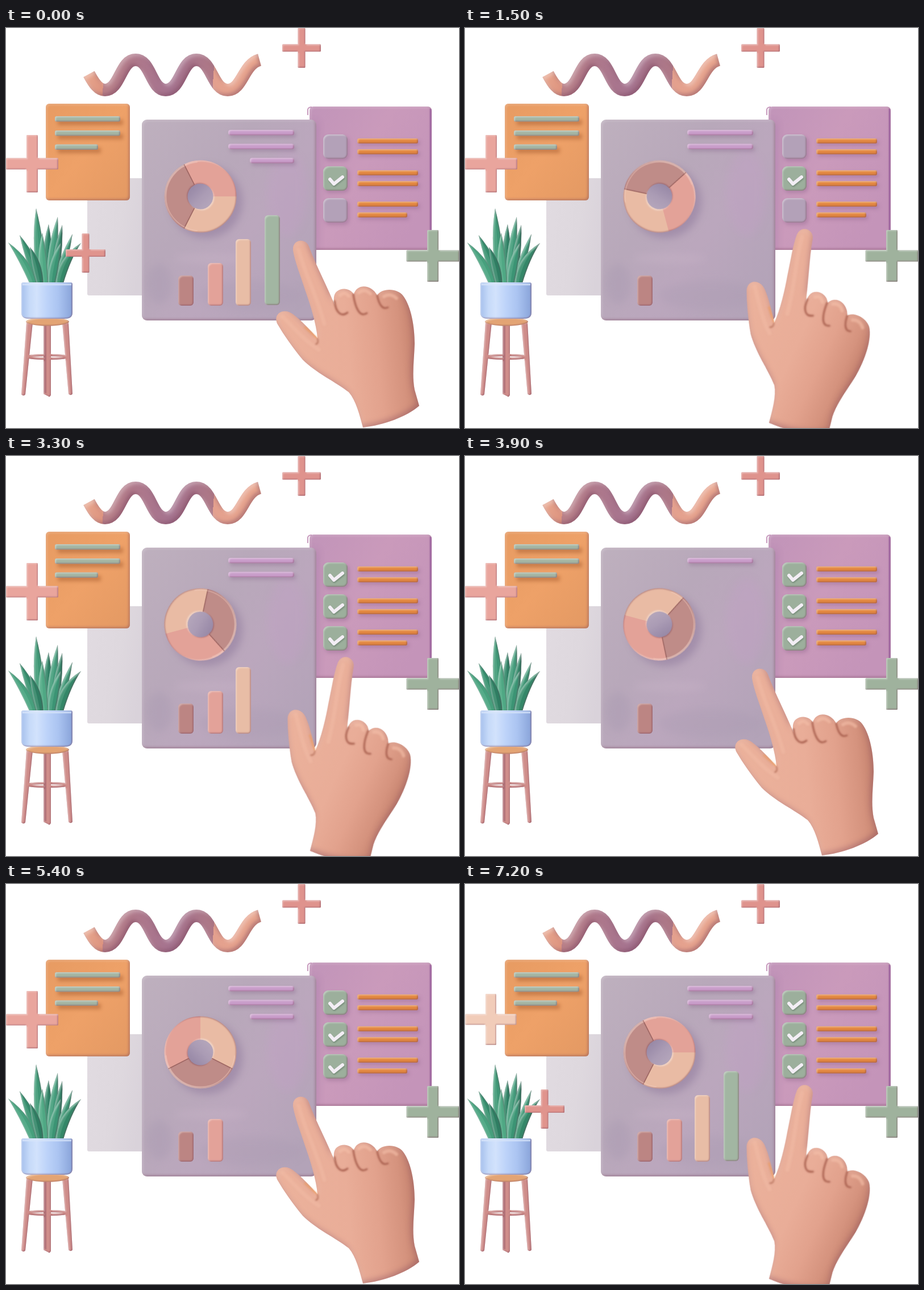
An HTML page that plays this animation: 797 px wide and 703 px high, repeating every 7500 ms.

```html
<!DOCTYPE html>
<html lang="en">
<head>
<meta charset="utf-8">
<title>Dashboard illustration</title>
<style>
html, body { margin: 0; width: 100%; height: 100%; overflow: hidden; background: #fff; }
svg { display: block; width: 100vw; height: 100vh; }
.soft { filter: url(#bevel); }
.round { filter: url(#roundBevel); }
.card { filter: url(#cardBevel); }
.raised { filter: url(#bevel) drop-shadow(3px 4px 3px #6d457040); }
.raisedWarm { filter: url(#bevel) drop-shadow(5px 6px 3px #9b4f2470); }
#dial { transform-origin: 342px 296px; animation: turn 7.5s steps(25) infinite; }
@keyframes turn { to { transform: rotate(375deg); } }
</style>
</head>
<body>
<svg viewBox="0 0 797 703" preserveAspectRatio="none">
  <defs id="defs">
    <linearGradient id="tube" gradientUnits="userSpaceOnUse" x1="137" y1="70" x2="447" y2="90">
      <stop offset="0" stop-color="#e9a88f"/><stop offset=".115" stop-color="#dc937f"/>
      <stop offset=".115" stop-color="#b98088"/><stop offset=".3" stop-color="#ae788b"/>
      <stop offset=".5" stop-color="#a5738f"/><stop offset=".735" stop-color="#ae7886"/>
      <stop offset=".735" stop-color="#e3a08e"/><stop offset="1" stop-color="#e9a68e"/>
    </linearGradient>
    <linearGradient id="orange" x2="1" y2="1">
      <stop offset="0" stop-color="#e79b62"/><stop offset=".5" stop-color="#eea168"/><stop offset="1" stop-color="#e39963"/>
    </linearGradient>
    <linearGradient id="pale" x2="1" y2=".3">
      <stop offset="0" stop-color="#e1dbe1"/><stop offset=".6" stop-color="#ded8de"/><stop offset="1" stop-color="#d9d2da"/>
    </linearGradient>
    <linearGradient id="panel" x2="1" y2=".8">
      <stop offset="0" stop-color="#beb0be"/><stop offset=".4" stop-color="#b8a8ba"/>
      <stop offset=".65" stop-color="#bba7bd"/><stop offset="1" stop-color="#b3a3b8"/>
    </linearGradient>
    <linearGradient id="pink" x2="1" y2=".6">
      <stop offset="0" stop-color="#c194b9"/><stop offset=".5" stop-color="#ca9abb"/><stop offset="1" stop-color="#c494b9"/>
    </linearGradient>
    <linearGradient id="pot">
      <stop offset="0" stop-color="#a5bfec"/><stop offset=".16" stop-color="#c6daf9"/><stop offset=".3" stop-color="#d2e2fc"/>
      <stop offset=".5" stop-color="#bdd3f9"/><stop offset=".72" stop-color="#abc4f1"/><stop offset="1" stop-color="#88a3d9"/>
    </linearGradient>
    <linearGradient id="skin" gradientUnits="userSpaceOnUse" x1="500" y1="560" x2="724" y2="540">
      <stop offset="0" stop-color="#ebb19b"/><stop offset=".45" stop-color="#e9ad98"/><stop offset=".68" stop-color="#e2a28d"/>
      <stop offset=".86" stop-color="#d5937e"/><stop offset="1" stop-color="#c27f6b"/>
    </linearGradient>
    <linearGradient id="hole" x2="1" y2="1">
      <stop offset="0" stop-color="#8f80a0"/><stop offset=".55" stop-color="#ab9cb5"/><stop offset="1" stop-color="#b9abbe"/>
    </linearGradient>
    <filter id="blur" x="-50%" y="-50%" width="200%" height="200%"><feGaussianBlur stdDeviation="7"/></filter>
    <filter id="haze" x="-20%" y="-20%" width="140%" height="140%"><feGaussianBlur stdDeviation="1.6"/></filter>
    <clipPath id="panelClip"><rect x="239" y="161" width="307" height="353" rx="9"/></clipPath>
    <clipPath id="pinkClip"><rect x="534" y="138" width="215" height="252" rx="7"/></clipPath>
  </defs>
  <g id="scene"></g>
</svg>
<script>
const $ = id => document.getElementById(id);

// Inner shading: a dark lower right edge and a light upper left edge.
const bevel = (id, off, blur, dark, light) => `
  <filter id="${id}" x="-25%" y="-25%" width="150%" height="150%" color-interpolation-filters="sRGB">
    <feOffset in="SourceAlpha" dx="${-off}" dy="${-off}"/><feGaussianBlur stdDeviation="${blur}"/>
    <feComposite in="SourceAlpha" operator="out" result="low"/>
    <feFlood flood-color="#723b55" flood-opacity="${dark}"/><feComposite in2="low" operator="in" result="shade"/>
    <feOffset in="SourceAlpha" dx="${off}" dy="${off}"/><feGaussianBlur stdDeviation="${blur}"/>
    <feComposite in="SourceAlpha" operator="out" result="high"/>
    <feFlood flood-color="#fff" flood-opacity="${light}"/><feComposite in2="high" operator="in" result="shine"/>
    <feMerge><feMergeNode in="SourceGraphic"/><feMergeNode in="shade"/><feMergeNode in="shine"/></feMerge>
  </filter>`;

const rect = (x, y, x2, y2, r, fill, cls = '', id = '') =>
  `<rect id="${id}" class="${cls}" x="${x}" y="${y}" width="${x2 - x}" height="${y2 - y}" rx="${r}" fill="${fill}"/>`;

const plus = (id, cx, cy, w, h, t, color) => {
  const s = t - 3, a = (w - t) / 2, b = (h - t) / 2;
  return `<path id="${id}" class="soft" fill="${color}" stroke="${color}" stroke-width="3" stroke-linejoin="round"
    d="M${cx - s / 2} ${cy - h / 2 + 1.5}h${s}v${b}h${a}v${s}h${-a}v${b}h${-s}v${-b}h${-a}v${-s}h${a}z"/>`;
};

const squiggle = () => `<path class="round" fill="none" stroke="url(#tube)" stroke-width="22"
  d="M146 81C155 98 163 109 174 109C201 109 201 56 228 56C255 56 255 109 281 109
     C308 109 308 56 335 56C362 56 363 109 390 109C416 109 417 64 446 56"/>`;

const orangeCard = () => rect(70, 133, 218, 303, 6, 'url(#orange)', 'card') +
  [[155, 201], [180, 201], [204.5, 162]].map(([y, x]) => rect(86, y, x, y + 9.5, 3, '#a4b5a3', 'raisedWarm')).join('');

const tick = (y, id) => `<g id="${id}">${rect(558, y, 601, y + 43, 9, '#9caf9c', 'soft')}
  <path d="M570 ${y + 23}l7 8 15-12" fill="none" stroke="#f3eef5" stroke-width="6" stroke-linecap="round"
  stroke-linejoin="round" style="filter:drop-shadow(1px 2px 1px #52665577)"/></g>`;

const pinkCard = () => rect(534, 138, 749, 390, 7, 'url(#pink)', 'card') +
  `<g clip-path="url(#pinkClip)"><rect x="525" y="165" width="24" height="240" fill="#8c5f97" opacity=".25" filter="url(#blur)"/>
   <path d="M747 142V388" stroke="#a26ba3" stroke-width="3"/></g>
   <path d="M531 153V143q1-4 7-4" fill="none" stroke="#c79abd" stroke-width="2"/>` +
  [187, 243, 299].map((y, i) => rect(558, y, 601, y + 43, 9, '#b3a1b8', 'raised') + tick(y, 'tick' + (i + 1))).join('') +
  [194, 213, 250, 269, 305, 324].map(y => rect(618, y, y > 320 ? 706 : 725, y + 9, 3, '#e3873f', 'raised')).join('');

const slice = (from, to, color) => `<circle cx="342" cy="296" r="43" fill="none" stroke="${color}" stroke-width="41"
  pathLength="360" stroke-dasharray="${to - from} 360" stroke-dashoffset="${-from}"/>`;

const seam = deg => `<path d="M365 296H405" stroke="#8d5450" stroke-width="1.6" opacity=".75" transform="rotate(${deg} 342 296)"/>`;

const donut = () => `<circle cx="352" cy="305" r="64" fill="#78608a" opacity=".35" filter="url(#blur)"/>
  <g id="dial"><circle cx="342" cy="296" r="24" fill="url(#hole)"/>
  <g class="soft">${slice(0, 117, '#e9bba4')}${slice(117, 243, '#bf8c88')}${slice(243, 360, '#e3a298')}</g>
  ${seam(117)}${seam(243)}
  <circle cx="342" cy="296" r="60.5" fill="none" stroke="#f5d0c2" stroke-opacity=".4" stroke-width="1.6"
    pathLength="360" stroke-dasharray="170 360" stroke-dashoffset="-95"/></g>`;

const panel = () => rect(239, 161, 546, 514, 9, 'url(#panel)', 'card') +
  `<g clip-path="url(#panelClip)" filter="url(#blur)" opacity=".3">
    <ellipse cx="270" cy="450" rx="22" ry="35" fill="#a394ad"/><ellipse cx="495" cy="290" rx="35" ry="75" fill="#c39fc6"/>
    <ellipse cx="360" cy="405" rx="65" ry="9" fill="#ccb8ca"/><ellipse cx="430" cy="470" rx="90" ry="25" fill="#a99ab1"/></g>` +
  [391, 391, 429].map((x, i) => rect(x, 179 + i * 24.6, 507, 188.5 + i * 24.6, 4, '#c99dca', 'raised', 'line' + (i + 1))).join('') +
  donut() +
  [[303, 435, '#bc8583'], [355, 413, '#e3a299'], [404, 371, '#e8bda6'], [455, 329, '#a2b6a2']]
    .map(([x, y, c], i) => rect(x, y, x + 27, i > 2 ? 487 : 488, 6, c, 'soft', 'bar' + (i + 1))).join('');

// A leaf has a dark right half and a light left half.
const leaf = ([base, cx, cy, tx, ty, w, c]) => {
  const edge = side => `Q${cx + side * w} ${cy} ${tx} ${ty}`;
  return `<g class="soft"><path fill="${c}" d="M${base - w / 2} 450${edge(-1)}Q${cx + w} ${cy} ${base + w / 2} 450z"/>
    <path fill="#8fd0b0" opacity=".22" d="M${base - w / 2} 450${edge(-1)}Q${cx} ${cy} ${base} 450z"/></g>`;
};

const plant = () => [
  [74, 72, 390, 75, 345, 12, '#2f7f64'], [78, 82, 385, 91, 332, 12, '#43997a'],
  [64, 56, 380, 53, 317, 13, '#3f9675'], [84, 90, 395, 99, 346, 11, '#317f64'],
  [57, 46, 405, 24, 364, 13, '#358b6c'], [89, 101, 405, 117, 362, 10, '#3d9273'],
  [48, 35, 408, 4, 377, 12, '#47a07d'], [94, 101, 405, 132, 378, 13, '#348768'],
  [69, 62, 405, 64, 360, 11, '#4fa884'], [80, 84, 410, 96, 378, 12, '#3b9474'], [60, 54, 410, 42, 385, 11, '#2f7d62']
].map(leaf).join('') + `
  <g class="soft"><ellipse cx="73" cy="578" rx="36" ry="3" fill="none" stroke="#cb8885" stroke-width="4"/>
    <path fill="#cf8d8a" d="M36 518h11L34 644q-3 4-7 0zM66 520h13v125q-2 5-5 2l-8-4zM99 518h11L117 643q-3 4-7 0z"/>
    <path fill="#b06f75" d="M66 520h5v122l-5-1z"/></g>
  <ellipse cx="73" cy="516" rx="38" ry="7.5" fill="#e3a474" class="soft"/>
  <path class="soft" fill="url(#pot)" d="M27 450q0-3 4-3h82q4 0 4 3v50q0 11-13 11h-64q-13 0-13-11z"/>
  <path d="M29 451H115" stroke="#d9e6fc" stroke-width="2.5" opacity=".8"/>`;

const hand = () => `<g id="hand"><path fill="url(#skin)" filter="url(#handBevel)"
  d="M505 391C503 371 527 368 533 384C545 417 566 455 583 498C576 484 574 470 582 463C592 455 606 458 612 468
     C617 449 643 450 653 470C660 457 688 456 699 471C713 490 719 525 719 555C718 585 714 610 719 636L727 664
     C705 683 665 698 628 702C622 680 616 655 603 640C580 622 545 606 522 583C503 560 488 538 478 521
     C468 503 488 490 505 503C520 514 535 531 548 545C546 520 535 485 526 460C517 432 508 410 505 391Z"/>
  <g fill="none" stroke-linecap="round" filter="url(#haze)">
    <path d="M578 480C580 500 590 509 601 500M611 468C614 490 622 510 635 501M653 470C656 485 662 496 672 491"
      stroke="#a9604f" stroke-width="3"/>
    <path d="M588 470q7-8 15 1M621 465q10-8 20 2M665 472q11-7 22 3" stroke="#f3bfa8" stroke-width="6" opacity=".6"/>
    <path d="M515 390C523 425 545 465 560 520M487 508C505 525 525 550 550 565" stroke="#f1bca6" stroke-width="7" opacity=".45"/>
    <path d="M548 546C550 551 549 554 545 556" stroke="#b46f58" stroke-width="2"/>
    <path d="M526 526L546 544" stroke="#ef9a55" stroke-width="3" opacity=".7"/>
  </g></g>`;

$('defs').insertAdjacentHTML('beforeend', bevel('bevel', 1.5, 1.2, .45, .35) +
  bevel('roundBevel', 4, 3, .4, .3) + bevel('cardBevel', 2, 2, .4, .22) + bevel('handBevel', 4, 5, .33, .1));

$('scene').innerHTML = squiggle() + plus('', 520, 35, 68, 70, 13, '#df938d') +
  rect(143, 264, 250, 470, 3, 'url(#pale)') + orangeCard() + pinkCard() + panel() + plant() +
  plus('leftSalmon', 46, 238.5, 92, 101, 20, '#e9a59d') + plus('leftPeach', 45.5, 238, 90, 90, 19, '#f1ccb9') +
  plus('small', 140, 395.5, 70, 69, 13, '#e0948d') +
  plus('rightGreen', 751, 400.5, 93, 91, 20, '#9fb29d') + plus('rightPink', 750.5, 400, 93, 92, 20, '#e7a49d') + hand();

// Steps at which each part switches between its two states.
const flips = {
  left: [1, 2, 4, 5, 6, 11, 14, 17, 19],
  small: [3, 6, 7, 8, 9, 10, 11, 12, 13, 14, 17, 19, 21, 23],
  right: [6, 9, 10, 11, 12, 13, 16, 17, 20, 23],
  hand: [3, 6, 9, 12, 14, 16, 19, 21, 23],
  tick1: [2, 3, 4, 5, 11, 14, 16, 21, 24],
  tick3: [1, 5, 7, 14, 15, 21, 23]
};
const flipped = (part, k) => flips[part].filter(s => s <= k).length % 2 === 1;
const show = (id, on) => $(id).style.display = on ? '' : 'none';

function pose(k) {
  const left = flipped('left', k), right = flipped('right', k);
  show('leftSalmon', !left);
  show('leftPeach', left);
  show('rightGreen', !right);
  show('rightPink', right);
  show('small', !flipped('small', k));
  show('tick1', flipped('tick1', k));
  show('tick3', flipped('tick3', k));
  for (let i = 1; i <= 4; i++) show('bar' + i, i <= (k % 4 || 4));
  for (let i = 1; i <= 3; i++) show('line' + i, i <= (k % 3 || 3));
  $('hand').setAttribute('transform', flipped('hand', k) ? 'translate(342 -228) rotate(30)' : '');
}

const start = performance.now();
let last = -1;
function update() {
  const k = Math.floor(Math.max(0, performance.now() - start) % 7500 / 300);
  if (k !== last) pose(last = k);
  requestAnimationFrame(update);
}
update();
</script>
</body>
</html>
```
